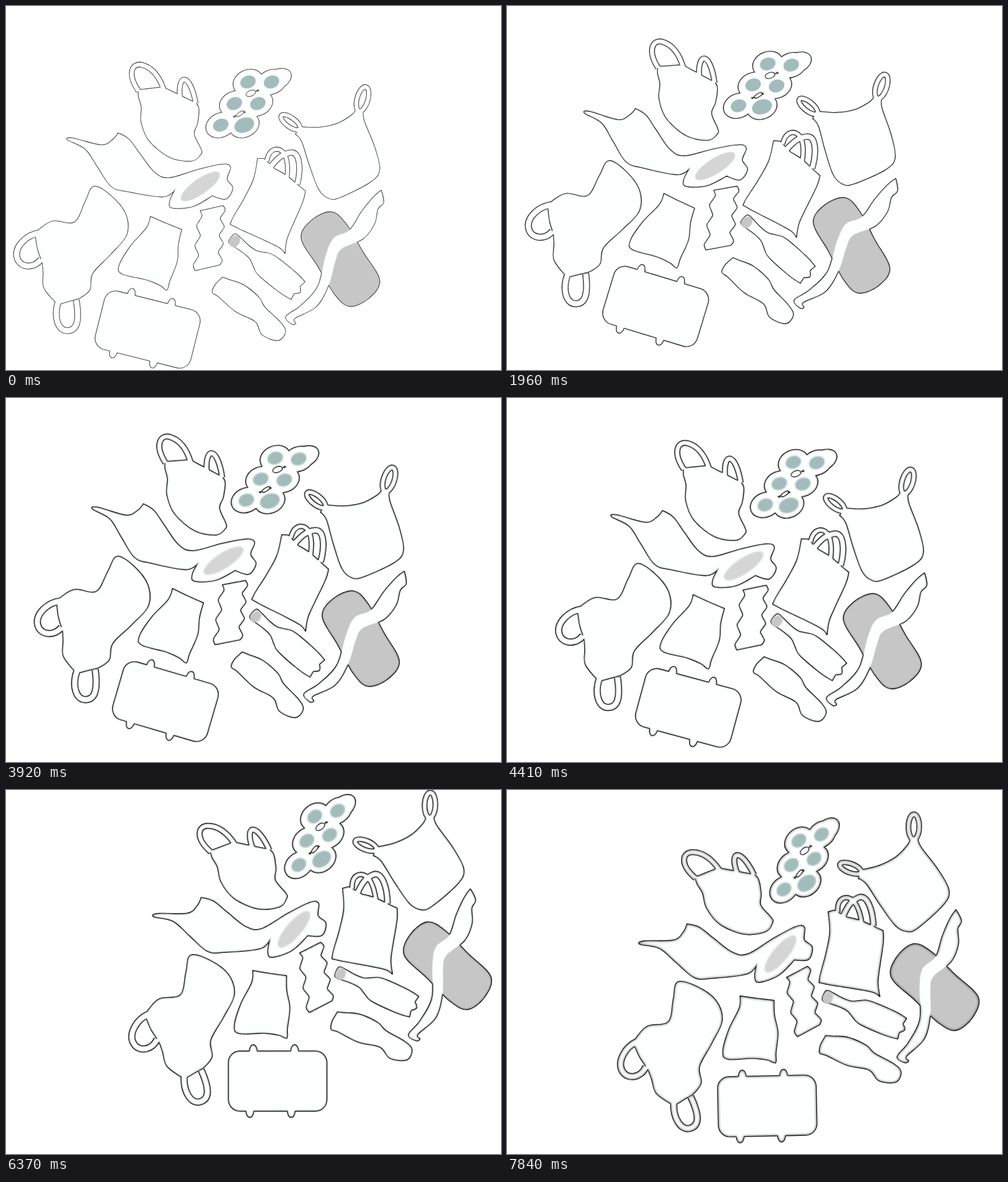
Write an HTML page that moves like this. It is 873 px wide and 641 px high and loops after 8000 ms.

```html
<!DOCTYPE html>
<html lang="en">
<head>
<meta charset="utf-8">
<title>Drifting packaging</title>
<style>
html, body { margin: 0; width: 100%; height: 100%; overflow: hidden; background: #fff; }
svg { display: block; width: 100vw; height: 100vh; }
#outlines { fill: none; stroke: #000; stroke-linejoin: round; stroke-width: calc(var(--band, 0px) + var(--line)); }
#outlines * { stroke-width: calc(var(--band, 0px) + var(--line)); }
#bodies { fill: #fdfffe; fill-rule: evenodd; }
#bodies .band { fill: none; stroke: #fdfffe; stroke-width: var(--band); }
</style>
</head>
<body>
<svg viewBox="0 0 873 641">
  <defs>
    <filter id="edge" filterUnits="userSpaceOnUse" x="0" y="80" width="690" height="570" color-interpolation-filters="sRGB">
      <feFlood flood-color="#000" result="ink"/>
      <feComposite in="ink" in2="SourceAlpha" operator="out"/>
      <feGaussianBlur id="edgeBlur"/>
      <feComposite in2="SourceAlpha" operator="in"/>
      <feComponentTransfer result="shade"><feFuncA id="edgeDepth" type="linear"/></feComponentTransfer>
      <feMerge><feMergeNode in="SourceGraphic"/><feMergeNode in="shade"/></feMerge>
    </filter>
    <filter id="soft" filterUnits="userSpaceOnUse" x="0" y="80" width="690" height="570" color-interpolation-filters="sRGB">
      <feGaussianBlur id="softBlur"/>
    </filter>
  </defs>
  <g id="scene">
    <g id="outlines"></g>
    <g id="bodies" filter="url(#edge)"></g>
    <g id="details" filter="url(#soft)"></g>
    <g id="slots" fill="#fff" stroke="#000"></g>
  </g>
</svg>
<script>
const SVG = 'http://www.w3.org/2000/svg';
const TEAL = '#a3bcbb', GREY = '#c6c6c6';
const $ = id => document.getElementById(id);

function add(parent, tag, attrs) {
  const el = document.createElementNS(SVG, tag);
  for (const key in attrs) el.setAttribute(key, attrs[key]);
  $(parent).append(el);
}

// Outlines lie below all bodies, so overlapping parts merge into one silhouette.
function part(tag, attrs, style = {}) {
  add('outlines', tag, attrs);
  add('bodies', tag, { ...attrs, ...style });
}

const points = text => text.split(' ').map(s => {
  const [x, y] = s.replace('!', '').split(',').map(Number);
  return { x, y, corner: s.endsWith('!') };
});

// Smooth closed curve; points marked "!" are corners.
function curve(pts) {
  const n = pts.length;
  const handle = (i, sign) => {
    const p = pts[i], a = pts[(i + n - 1) % n], b = pts[(i + 1) % n];
    const k = p.corner ? 0 : sign / 6;
    return `${p.x + (b.x - a.x) * k},${p.y + (b.y - a.y) * k}`;
  };
  return pts.reduce((d, _, i) => {
    const j = (i + 1) % n;
    return `${d}C${handle(i, 1)} ${handle(j, -1)} ${pts[j].x},${pts[j].y}`;
  }, `M${pts[0].x},${pts[0].y}`) + 'Z';
}

const ellipse = (cx, cy, rx, ry, turn) => ({ cx, cy, rx, ry, transform: `rotate(${turn} ${cx} ${cy})` });
const shape = (text, style) => part('path', { d: curve(points(text)) }, style);
const band = (d, width) => part('path', { d, class: 'band', style: `--band:${width}px` });
const ring = (x, y, rx, ry, turn, width) =>
  part('ellipse', { ...ellipse(x, y, rx, ry, turn), class: 'band', style: `--band:${width}px` });
const spot = (x, y, rx, ry, turn, fill) => add('details', 'ellipse', { ...ellipse(x, y, rx, ry, turn), fill });

// A line from a to b with a sideways sine ripple
function ripple(a, b, waves, height) {
  const count = waves * 4;
  return Array.from({ length: count + 1 }, (_, i) => {
    const t = i / count;
    return {
      x: a[0] + (b[0] - a[0]) * t + height * Math.sin(t * waves * 2 * Math.PI),
      y: a[1] + (b[1] - a[1]) * t,
      corner: t === 0 || t === 1
    };
  });
}

function twoHandledBag() {
  band('M234,150C212,118 224,100 240,104S270,122 279,149', 8);
  band('M307,160C303,118 325,118 335,172', 8);
  shape('234,148! 277,143! 304,156! 333,170! 340,180 338,206 332,226 344,252 344,261 328,273 290,267 254,239 239,206 239,178 234,160');
}

function sixPack() {
  const cans = [];
  for (let row = 0; row < 3; row++)
    for (let col = 0; col < 2; col++) cans.push([427 - 24 * row + 41.5 * col, 134 + 38 * row]);
  for (const [x, y] of cans) part('ellipse', ellipse(x, y, 27, 21, -25));
  part('ellipse', ellipse(478, 130, 27, 17, -28));
  cans.forEach(([x, y], i) => spot(x, y, i === 5 ? 18 : 14, i === 5 ? 13 : 11, -22, TEAL));
  for (const i of [0, 1]) add('slots', 'ellipse', ellipse(432 - 19 * i, 154 + 36 * i, 9 - i, 5 - 2 * i, -22 - 12 * i));
}

function wideBag() {
  ring(502, 205, 20, 8, 36, 7);
  ring(629, 164, 22, 9.5, -74, 7.5);
  shape('519,213! 552,214 585,207 609,193 617,184! 630,186! 632,203 650,248 659,288 643,310 590,337 570,339 552,323 535,279 522,239 511,226!');
}

function film() {
  shape('109,236 118,233 168,245 188,236 198,224! 217,235 236,260 262,293 288,303 340,288 382,279 396,284 390,305 400,321 388,340 364,334! 330,353 294,356 289,345 300,321! 278,336 215,327 186,318 162,284 140,252');
  spot(343, 318, 41, 13.5, -35, '#d5d5d5');
}

function largeBag() {
  band('M62,446C50,464 22,462 19,440C17,424 35,404 58,400', 10);
  band('M92,522C84,548 92,572 108,572C124,572 131,558 124,518', 10);
  shape('155,318 185,334 211,366 213,403 185,437 153,471 148,500 129,515! 95,525! 86,520! 67,496 66,470 64,450! 56,428 52,402! 62,391 84,379 121,381 140,345');
}

function carrierBag() {
  band('M460,274C464,250 482,246 492,262C498,275 497,290 496,302', 7);
  band('M468,282C478,270 486,261 502,258.5C518,256 521,285 514,314', 9);
  shape('444,269! 455,269! 474,287! 495,299 518,318! 528,326! 523,346 503,392 495,413 492,436! 483,426 455,412 403,388 398,379 420,340 437,305');
}

function pouchAndSnack() {
  shape('255,371! 280,382 310,394! 304,420 302,450 289,484 284,500 272,492 247,482 205,472 200,457 220,423 248,391');
  const right = ripple([383, 352], [377, 456], 3.5, 4);
  const left = ripple([334, 466], [343, 361], 3, -4);
  part('path', { d: curve([...right, ...left]) });
}

function bottles() {
  const side = points('0,8.5 12,9.5 30,8 48,9 62,16 78,22 125,22.5 149,19.5! 147,8!');
  const mirrored = side.map(p => ({ ...p, y: -p.y })).reverse();
  part('path', { d: curve([...side, { x: 154, y: 0 }, ...mirrored]), transform: 'translate(398.5 408.5) rotate(38.5)' });
  spot(403.5, 414.5, 9, 11, 38, GREY);
  shape('370,490! 382,478! 396,483! 420,492 446,513 457,531 484,557 493,574 480,589 452,579 440,556 405,538 375,512 364,504');
}

function tabbedTray() {
  const transform = 'translate(250 570) rotate(14.1)';
  for (const x of [-43, 30])
    for (const side of [-1, 1])
      part('ellipse', { cx: x - 3 - 3 * side, cy: 52 * side, rx: 6.5, ry: 11.5, transform });
  part('rect', { x: -86.5, y: -52.5, width: 173, height: 105, rx: 20, transform });
}

function greyTrayAndStrip() {
  const half = points('521,409 540,377 574,363 600,384 630,434');
  const opposite = half.map(p => ({ x: 1180 - p.x, y: 892 - p.y }));
  part('path', { d: curve([...half, ...opposite]) }, { fill: GREY });
  shape('662,325! 666,346 656,358 650,384 630,410 592,428 581,450 570,490 548,529 510,550 511,559 504,560 494,547 520,528 550,494 564,440 578,409 606,395 627,363 648,337');
}

[twoHandledBag, sixPack, wideBag, film, largeBag, carrierBag, pouchAndSnack, bottles, tabbedTray, greyTrayAndStrip]
  .forEach(build => build());

// Key poses: step, centre x, centre y, turn in degrees
const KEYS = [
  [0, 380, 408, 0], [1, 381, 404, 3], [2, 398, 387, 2], [4, 402, 360.5, 3.5],
  [5, 394.5, 370, 4.3], [6, 421, 372, 3.2], [7, 417.5, 378, 2.2], [8, 453, 386.5, 1.1],
  [10, 494, 369.5, -4.8], [12, 566, 324, -14.1], [13, 529.5, 350, -8.5], [15, 542, 366, -15.3]
];
const LOOP = 8000, STEP = 490, LAST = 15;

function poseAt(step) {
  const next = Math.max(1, KEYS.findIndex(key => key[0] >= step));
  const a = KEYS[next - 1], b = KEYS[next];
  const t = (step - a[0]) / (b[0] - a[0]);
  return a.map((v, i) => v + (b[i] - v) * t).slice(1);
}

function draw(time) {
  const step = Math.min(LAST, Math.max(0, Math.floor(time % LOOP / STEP) - 1));
  const [x, y, turn] = poseAt(step);
  $('scene').setAttribute('transform', `translate(${x} ${y}) rotate(${turn}) translate(-380.25 -408.25)`);
  // Edges thicken, soften and darken with every step
  const line = 1.6 + 0.2 * Math.min(step, 5);
  $('scene').style.setProperty('--line', `${line}px`);
  $('slots').setAttribute('stroke-width', line / 2);
  $('edgeBlur').setAttribute('stdDeviation', 0.3 + 0.43 * Math.sqrt(step));
  $('edgeDepth').setAttribute('slope', 0.3 + 0.035 * step);
  $('softBlur').setAttribute('stdDeviation', 0.5 + 0.05 * step);
}

const start = performance.now();
function tick() {
  draw(performance.now() - start);
  requestAnimationFrame(tick);
}
tick();
</script>
</body>
</html>
```
